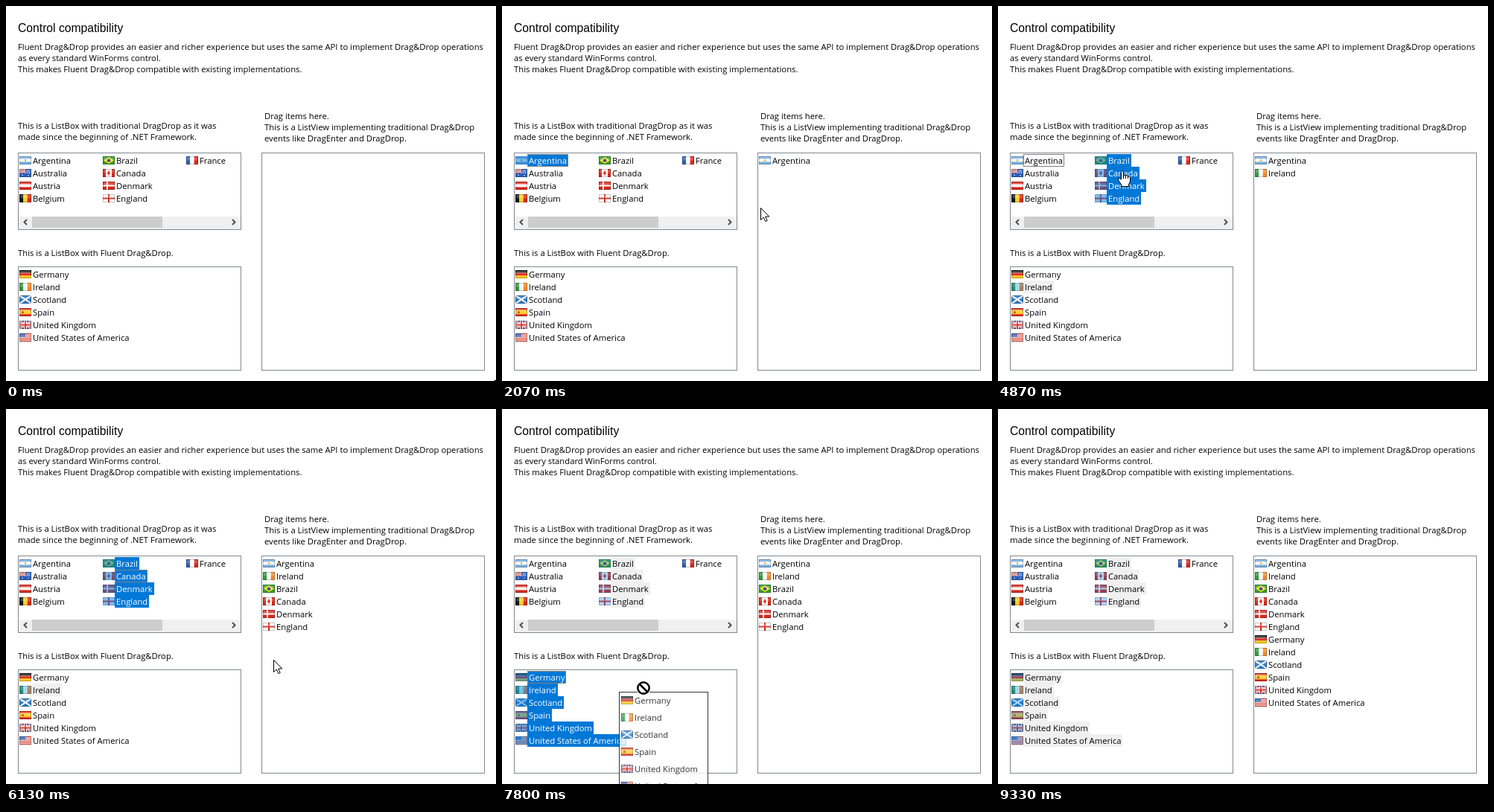
Animation of 658 by 504 pixels, one loop 9.47 s. Source, as an HTML page with a canvas:

```html
<!DOCTYPE html>
<html lang="en">
<head>
<meta charset="utf-8">
<title>Control compatibility</title>
<style>
html, body { margin: 0; width: 100%; height: 100%; overflow: hidden; background: #fff }
canvas { display: block }
</style>
</head>
<body>
<canvas id="stage" width="658" height="504"></canvas>
<script>
const g = document.getElementById('stage').getContext('2d');
const LOOP = 9470, FONT = '11.25px "Open Sans", "Noto Sans", sans-serif';
const BLUE = '#0078d7', RED = '#d8281c', NAVY = '#1f3f94';

// ---- basic shapes
function rect(color, x, y, w, h) {
  g.fillStyle = color;
  g.fillRect(x, y, w, h);
}
function frame(color, x, y, w, h) {
  g.strokeStyle = color;
  g.lineWidth = 1;
  g.strokeRect(x + .5, y + .5, w - 1, h - 1);
}
function text(str, x, y, color = '#000', font = FONT) {
  g.font = font;
  g.fillStyle = color;
  g.fillText(str, x, y);
}
function dot(color, x, y, r) {
  g.fillStyle = color;
  g.beginPath();
  g.arc(x, y, r, 0, 7);
  g.fill();
}
function line(color, width, ...p) {
  g.strokeStyle = color;
  g.lineWidth = width;
  g.beginPath();
  for (let i = 0; i < p.length; i += 2) g.lineTo(p[i], p[i + 1]);
  g.stroke();
}
// inverted one-pixel dots, as used for focus and selection frames
function dotted(x, y, w, h) {
  g.save();
  g.globalCompositeOperation = 'difference';
  g.setLineDash([1, 1]);
  frame('#fff', Math.round(x), Math.round(y), Math.round(w), Math.round(h));
  g.restore();
}

// ---- flags, 16 x 11
const rows = (...c) => c.forEach((k, i) => rect(k, 0, i * 11 / c.length, 16, 11 / c.length));
const cols = (...c) => c.forEach((k, i) => rect(k, i * 16 / c.length, 0, 16 / c.length, 11));
const plus = (c, w, x = 8, y = 5.5) => {
  rect(c, x - w / 2, 0, w, 11);
  rect(c, 0, y - w / 2, 16, w);
};
const saltire = (c, w) => {
  line(c, w, 0, 0, 16, 11);
  line(c, w, 0, 11, 16, 0);
};
const union = () => {
  rows(NAVY);
  saltire('#fff', 2.6);
  saltire(RED, 1);
  plus('#fff', 4);
  plus(RED, 2);
};
const flags = {
  Argentina() { rows('#79b0e2', '#fff', '#79b0e2'); dot('#e8b13a', 8, 5.5, 1.4); },
  Australia() {
    rows('#2a5fb8');
    g.save(); g.scale(.5, .5); union(); g.restore();
    [[4, 8.5], [12, 2.5], [10.5, 5], [13.5, 5], [12, 8.5]].forEach(p => dot('#fff', ...p, .7));
  },
  Austria() { rows(RED, '#fff', RED); },
  Belgium() { cols('#111', '#fbd01c', RED); },
  Brazil() {
    rows('#2f9a2a');
    g.fillStyle = '#f8dc28';
    g.beginPath();
    [[8, 1], [15, 5.5], [8, 10], [1, 5.5]].forEach(p => g.lineTo(...p));
    g.fill();
    dot(NAVY, 8, 5.5, 2.2);
  },
  Canada() {
    cols(RED, '#fff', '#fff', RED);
    dot(RED, 8, 5.2, 2);
    rect(RED, 7.5, 2, 1, 7);
  },
  Denmark() { rows(RED); plus('#fff', 2, 6); },
  England() { rows('#fff'); plus(RED, 2); },
  France() { cols('#2d5fb5', '#fff', RED); },
  Germany() { rows('#1a1a1a', RED, '#f8c81c'); },
  Ireland() { cols('#2f9a3c', '#fff', '#f08a28'); },
  Scotland() { rows('#2878c4'); saltire('#fff', 2); },
  Spain() { rows(RED, '#fbc81c', '#fbc81c', RED); rect('#b8641c', 3, 4, 3, 3); },
  'United Kingdom': union,
  'United States of America'() {
    rows(RED, '#fff', RED, '#fff', RED, '#fff', RED, '#fff', RED, '#fff', RED);
    rect('#3a63b0', 0, 0, 8, 5);
  }
};
function flag(name, x, y, tint) {
  g.save();
  g.translate(x, y);
  g.beginPath();
  g.rect(0, 0, 16, 11);
  g.clip();
  flags[name]();
  rect('rgba(255,255,255,.2)', 1, 1, 14, 4.5);
  frame('rgba(0,0,0,.22)', 0, 0, 16, 11);
  if (tint) {
    g.globalAlpha = tint;
    rect(BLUE, 0, 0, 16, 11);
  }
  g.restore();
}

// ---- list contents
const place = (names, x, y) => names.map((name, i) => ({ name, x, y: y + 17 * i }));
const middle = ['Brazil', 'Canada', 'Denmark', 'England'];
const lower = ['Germany', 'Ireland', 'Scotland', 'Spain', 'United Kingdom', 'United States of America'];
const lists = [
  [...place(['Argentina', 'Australia', 'Austria', 'Belgium'], 18, 199),
   ...place(middle, 130, 199), ...place(['France'], 242, 199)],
  place(lower, 18, 352)
];
const drops = [[1600, ['Argentina']], [3400, ['Ireland']], [5600, middle], [8730, lower]];

function labelWidth(name) {
  g.font = FONT;
  return Math.round(g.measureText(name).width) + 4;
}
function item({ name, x, y }, selected, active, focused) {
  const w = labelWidth(name);
  if (selected) rect(active ? BLUE : '#f0f0f0', x + 16, y, w, 17);
  flag(name, x, y + 3, selected ? (active ? .5 : .3) : 0);
  text(name, x + 18, y + 13, selected && active ? '#fff' : '#000');
  if (focused) dotted(x + 16, y, w, 17);
}

// ---- pointer path: time, x, y
const path = [
  [0, 656, 502], [70, 640, 488], [730, 76, 209], [800, 76, 209], [1000, 131, 211],
  [1530, 352, 228], [2000, 352, 228], [2070, 347, 271], [2470, 55, 374], [2600, 55, 374],
  [2930, 427, 257], [3000, 427, 256], [3130, 418, 239], [3670, 418, 239],
  [4130, 205, 276], [4200, 205, 276], [4600, 160, 206], [4800, 160, 206],
  [4870, 167, 221], [5470, 402, 296], [5600, 411, 298], [6000, 411, 298],
  [6400, 152, 486], [6600, 143, 465], [7000, 83, 362], [7200, 66, 353],
  [7330, 56, 361], [7400, 56, 361], [7730, 148, 372], [7800, 190, 375],
  [8070, 368, 319], [8870, 368, 319], [9130, 110, 512], [LOOP, 110, 512]
];
const still = (a, b) => !a || !b || (a[1] === b[1] && a[2] === b[2]);
function slope(i, k) {
  const a = path[i - 1], p = path[i], b = path[i + 1];
  return still(a, p) || still(p, b) ? 0 : (b[k] - a[k]) / (b[0] - a[0]);
}
function pointer(t) {
  let i = 0;
  while (i < path.length - 2 && path[i + 1][0] <= t) i++;
  const a = path[i], b = path[i + 1], d = b[0] - a[0];
  const u = Math.min(1, Math.max(0, (t - a[0]) / d)), v = 1 - u;
  return [1, 2].map(k => Math.round(
    a[k] * v * v * (1 + 2 * u) + b[k] * u * u * (1 + 2 * v) +
    d * u * v * (v * slope(i, k) - u * slope(i + 1, k))));
}

// ---- cursors
const arrowShape = new Path2D('M.5 .5V16.5L4.2 13L6.8 18.6L9.2 17.6L6.7 12H11.8Z');
const handShape = new Path2D('M-1.5 12V1.5Q0-.5 1.5 1.5V7Q3 5 4.5 7Q6 5.5 7.5 8Q9 7 10.5 9V15L8.5 19V21.5H-1.5V19L-5.5 13Q-6 10-4 10.5Z');
function outlined(shape) {
  g.fillStyle = '#fff';
  g.fill(shape);
  g.strokeStyle = '#000';
  g.lineWidth = 1;
  g.stroke(shape);
}
function ring(color, width) {
  line(color, width, -5, -5, 5, 5);
  g.beginPath();
  g.arc(0, 0, 7.7, 0, 7);
  g.stroke();
}
const cursors = {
  arrow: () => outlined(arrowShape),
  hand() {
    outlined(handShape);
    [1.5, 4.5, 7.5].forEach(x => line('#000', 1, x, 7, x, 11));
  },
  no() { ring('#fff', 4.5); ring('#000', 2.5); },
  copy() {
    dotted(3, 15, 17, 10);
    dotted(4, 16, 15, 8);
    outlined(arrowShape);
    rect('#fff', 9, 20, 12, 11);
    frame('#000', 9, 20, 12, 11);
    rect('#000', 12, 25, 6, 1);
    rect('#000', 14.5, 23, 1, 5);
  }
};

function preview(names, [px, py]) {
  const x = px + 9, y = py + 8, h = 23 * names.length;
  g.save();
  g.globalAlpha = .8;
  rect('#fff', x, y, 120, h);
  frame('#000', x, y, 120, h);
  names.forEach((name, i) => {
    flag(name, x + 3, y + 6 + 23 * i);
    text(name.replace(' America', ''), x + 21, y + 16 + 23 * i);
  });
  g.restore();
}

// ---- fixed parts
function form() {
  rect('#fff', 0, 0, 658, 504);
  text('Control compatibility', 16, 35, '#000', '15.7px "Liberation Sans", Arial, sans-serif');
  const lines = (x, y, ...s) => s.forEach((str, i) => text(str, x, y + 15 * i));
  lines(16, 59,
    'Fluent Drag&Drop provides an easier and richer experience but uses the same API to implement Drag&Drop operations',
    'as every standard WinForms control.',
    'This makes Fluent Drag&Drop compatible with existing implementations.');
  lines(16, 165, 'This is a ListBox with traditional DragDrop as it was',
    'made since the beginning of .NET Framework.');
  lines(16, 336, 'This is a ListBox with Fluent Drag&Drop.');
  lines(347, 152, 'Drag items here.', 'This is a ListView implementing traditional Drag&Drop',
    'events like DragEnter and DragDrop.');
  frame('#828790', 16, 197, 300, 104);
  frame('#828790', 16, 350, 300, 140);
  frame('#828790', 343, 197, 300, 293);
  rect('#f0f0f0', 17, 283, 298, 17);
  rect('#cdcdcd', 35, 283, 175, 15);
  line('#505050', 2, 28, 287, 24.5, 290.5, 28, 294);
  line('#505050', 2, 304, 287, 307.5, 290.5, 304, 294);
}

// ---- state at a time
const bands = [[4200, 4670, 4600], [6600, 7070, 7000]];
const drags = [[870, 1600], [2600, 3400, ['Ireland']], [4930, 5600], [7470, 8730, lower]];
const single = [['Argentina', 800], ['Ireland', 2530]];

function bandBox(k, t) {
  const [x0, y0] = pointer(bands[k][0]), [x, y] = pointer(Math.min(t, bands[k][2]));
  return { x: Math.min(x, x0), y: Math.min(y, y0), w: Math.abs(x - x0) + 1, h: Math.abs(y - y0) + 1 };
}
function isSelected(it, k, t) {
  if (t < bands[k][0]) return it.name === single[k][0] && t >= single[k][1];
  const b = bandBox(k, t), w = k ? 150 : 110;
  return it.x < b.x + b.w && it.x + w > b.x && it.y < b.y + b.h && it.y + 17 > b.y;
}
function activeList(t) {
  return t < 800 || t >= 9330 ? -1 : t < 2530 ? 0 : t < 4200 ? 1 : t < 6600 ? 0 : 1;
}

const stepTime = n => Math.round(n * 100 / 15) * 10;

function draw(n) {
  const t = stepTime(n), [x, y] = pointer(t), active = activeList(t);
  const during = ([from, to]) => t >= from && t < to;
  const focus = [t < 4930 ? 'Argentina' : 'Canada', t < 7470 ? 'Ireland' : 'Germany'];
  form();
  lists.forEach((list, k) => list.forEach(it =>
    item(it, isSelected(it, k, t), k === active, k === active && it.name === focus[k])));
  place(drops.flatMap(([at, names]) => t >= at ? names : []), 345, 199).forEach(it => item(it));

  const band = bands.findIndex(during), drag = drags.find(during);
  if (band >= 0) {
    const b = bandBox(band, t);
    dotted(b.x, b.y, b.w, b.h);
  }
  // the dragged picture trails the pointer by one step
  if (drag && drag[2]) preview(drag[2], pointer(stepTime(n - 1)));

  const hover = lists.flat().some(it =>
    x >= it.x && x < it.x + 16 + labelWidth(it.name) && y >= it.y && y < it.y + 17);
  const kind = drag ? (x > 343 ? 'copy' : 'no') : hover && band < 0 ? 'hand' : 'arrow';
  g.save();
  g.translate(x, y);
  cursors[kind]();
  g.restore();
}

const start = performance.now();
function tick() {
  const t = (performance.now() - start) % LOOP;
  draw(Math.min(141, Math.floor(t * .015 + .06)));
  requestAnimationFrame(tick);
}
tick();
</script>
</body>
</html>
```
